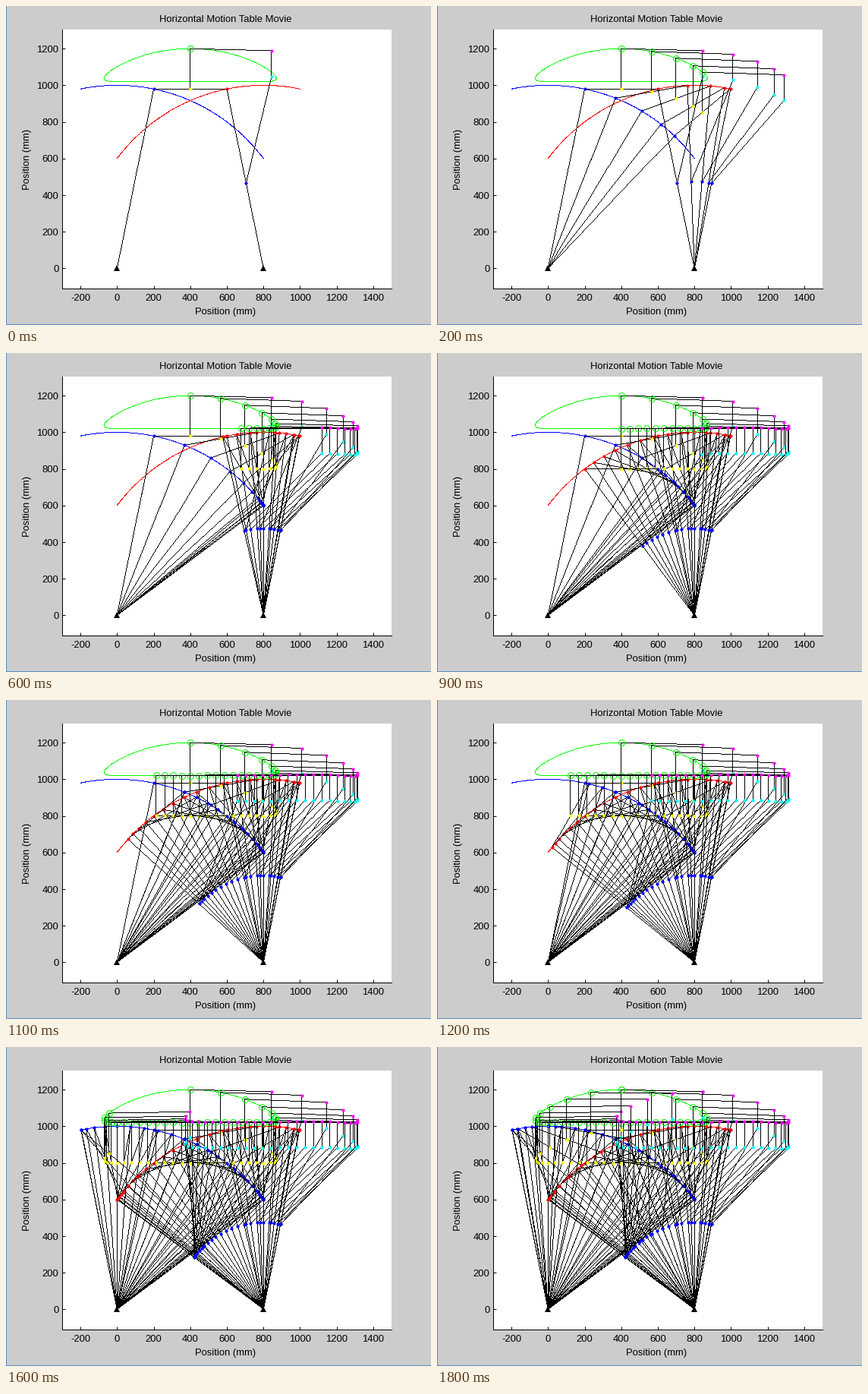
Recreate the animation shown at these times as a matplotlib script. Size 560 by 420 pixels, loop 1.9 s.

```python
import numpy as np
import matplotlib.pyplot as plt
from matplotlib.animation import FuncAnimation
from matplotlib.transforms import Affine2D

W, H, DPI = 560, 420, 100
PX = 72 / DPI                       # one pixel in points
SCALE = 434 / 1800                  # pixels per mm
FRAMES, INTERVAL = 19, 100
STEP = np.radians(10)               # coupler rotation per drawn pose

# Linkage dimensions in mm
A, B = np.array([0.0, 0.0]), np.array([800.0, 0.0])
ROCKER, COUPLER = 1000, 400
ELBOW = 0.475                       # joint position along the right rocker
REACH, STRUT = 450, 600
POST_L, POST_R = np.array([0, 220]), np.array([0, 140])


def meet(c1, r1, c2, r2):
    """Intersection of two circles, on the left of the line c1 -> c2."""
    d = c2 - c1
    dist = np.hypot(*d)
    along = (r1**2 - r2**2 + dist**2) / (2 * dist)
    rise = np.sqrt(r1**2 - along**2)
    return c1 + (along * d + rise * np.array([-d[1], d[0]])) / dist


def pose(phi):
    """Joint positions for one coupler angle."""
    bar = COUPLER * np.array([np.cos(phi), np.sin(phi)])
    p = meet(A, ROCKER, B - bar, ROCKER)
    q = p + bar
    mid = p + bar / 2
    elbow = B + ELBOW * (q - B)
    arms = meet(elbow, STRUT, mid, REACH), meet(mid, REACH, elbow, STRUT)
    arm = max(arms, key=lambda pt: pt[0])
    return dict(p=p, q=q, mid=mid, elbow=elbow, arm=arm,
                left=mid + POST_L, right=arm + POST_R)


plt.rcParams["font.family"] = "Liberation Sans"
plt.rcParams["font.size"] = 13 * PX
plt.rcParams["axes.unicode_minus"] = False

fig = plt.figure(figsize=(W / DPI, H / DPI), dpi=DPI, facecolor="#cccccc")
ax = fig.add_axes([74 / W, 48 / H, 434 / W, 341.4 / H])
ax.set_xlim(-300, 1500)
ax.set_ylim(-110, 1306)
ax.set_xticks(range(-200, 1401, 200))
ax.set_yticks(range(0, 1201, 200))
ax.tick_params(direction="in", length=4 * PX, width=PX)
ax.tick_params(axis="x", pad=7.5 * PX)
ax.tick_params(axis="y", pad=4.5 * PX)
for side, spine in ax.spines.items():
    spine.set_linewidth(PX)
    spine.set_visible(side in ("left", "bottom"))


def label(x, y, text, **kw):
    fig.text(x / W, 1 - y / H, text, ha="center", va="baseline", **kw)


label(289.5, 21, "Horizontal Motion Table Movie")
label(289.5, 406, "Position (mm)")
label(31, 202, "Position (mm)", rotation=90, rotation_mode="anchor")
for w, h in ((1 / W, 1), (1, 1 / H)):
    fig.add_artist(plt.Rectangle((0, 0), w, h, transform=fig.transFigure,
                                 fc="#5a8fc8", lw=0))

# Pixel markers are placed by rounding; shift so they fall in their own cell
PIXEL_GRID = ax.transData + Affine2D().translate(-0.5, -0.5)


def hairline(*chains, color="black"):
    """Crisp one-pixel polylines, one pixel per step of the longer axis."""
    dots = []
    for chain in chains:
        for a, b in zip(chain, chain[1:]):
            n = int(np.ceil(np.abs(b - a).max() * SCALE)) + 1
            dots.append(np.linspace(a, b, n))
    return ax.plot(*np.concatenate(dots).T, ",", color=color,
                   transform=PIXEL_GRID)[0]


def marker(point, color, shape="o", size=4.2, **kw):
    style = dict(mfc=color, mec=color, mew=0)
    style.update(kw)
    return ax.plot(*point, shape, ms=size * PX, **style)[0]


# Paths of the joints over a full turn
turn = [pose(a) for a in np.linspace(0, 2 * np.pi, 361)]
for name, color in (("p", "#0000ff"), ("q", "#ff0000"), ("left", "#00ff00")):
    hairline([s[name] for s in turn], color=color)
for pivot in (A, B):
    marker(pivot, "black", "^", 8.5)

DOTS = dict(p="#0000ff", q="#ff0000", mid="#ffff00", elbow="#0000ff",
            arm="#00ffff", right="#ff00ff")


def draw_pose(s):
    parts = [hairline([A, s["p"], s["q"], B],
                      [s[k] for k in ("elbow", "arm", "right", "left", "mid")])]
    parts += [marker(s[name], color) for name, color in DOTS.items()]
    parts.append(marker(s["left"], "#00ff00", size=8, mfc="none", mew=PX))
    return parts


poses = [draw_pose(pose(i * STEP)) for i in range(2 * FRAMES - 1)]


def update(n):
    for i, parts in enumerate(poses):
        for part in parts:
            part.set_visible(i <= 2 * n)
    return []


anim = FuncAnimation(fig, update, frames=FRAMES, interval=INTERVAL,
                     repeat=True, repeat_delay=0, blit=False)
plt.show()
```
